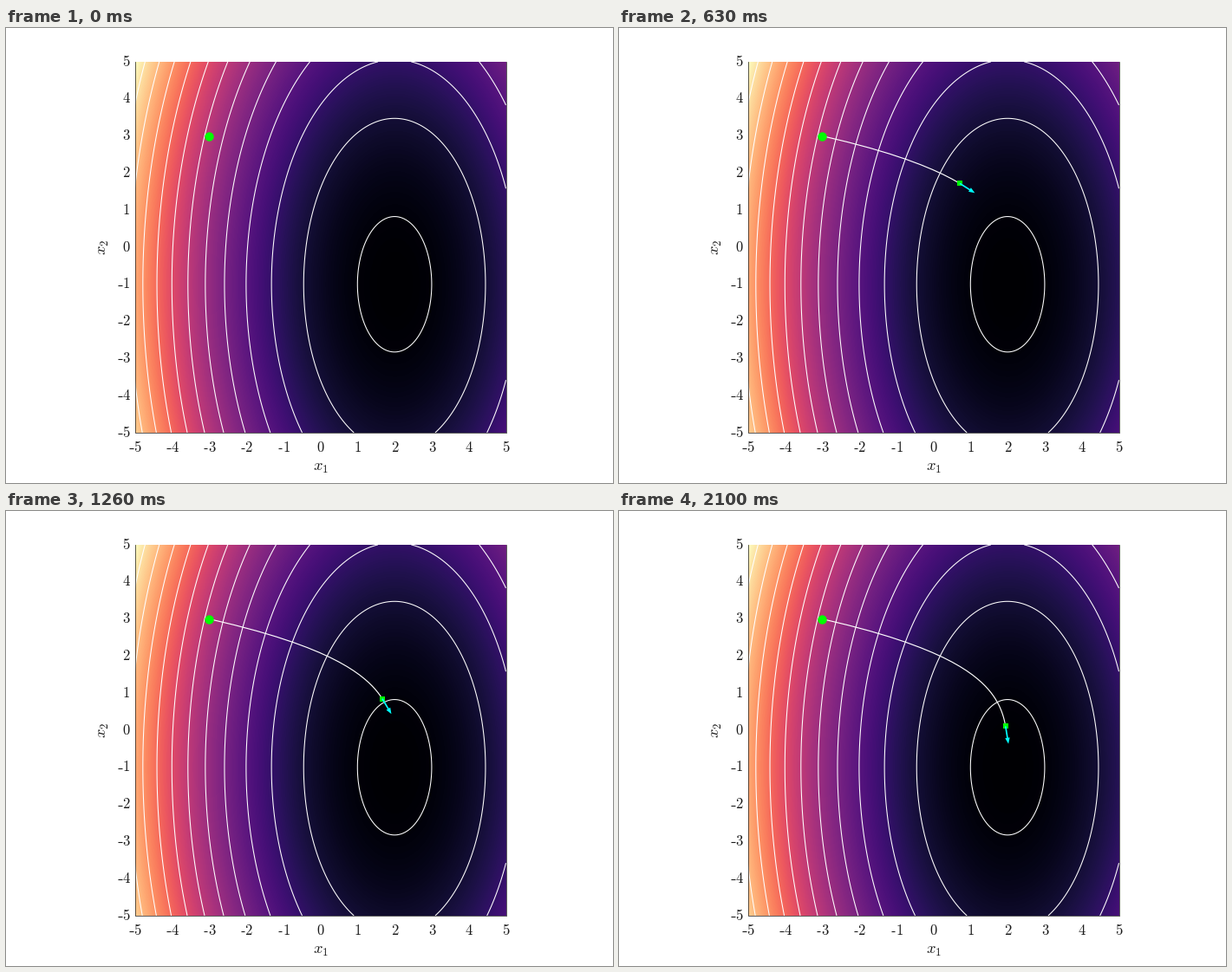
A matplotlib script that plays this animation: 700 px wide and 525 px high, repeating every 2.17 s.

```python
import numpy as np
import matplotlib.pyplot as plt
from matplotlib.animation import FuncAnimation

plt.rcParams["mathtext.fontset"] = "cm"

W, H, DPI = 700, 525, 100
FRAMES, INTERVAL = 31, 70
UNIT = 42.8                     # pixels per data unit
CX, CY = 362.5, 252.9           # pixel position of the data origin
LEFT, RIGHT = CX - 5 * UNIT, CX + 5 * UNIT
TOP, BOTTOM = CY - 5 * UNIT, CY + 5 * UNIT
PX = 72 / DPI                   # points per pixel
EM = 16.5                       # tick label size in pixels
GREEN, CYAN, INK = "#00ff00", "#00ffff", "#1a1a1a"

CENTER = np.array([2.0, -1.0])
CURVE = np.array([1.0, 0.3])
START = np.array([-3.0, 3.0])
RATE = 0.07
ARROW = 20.5


def cost(x, y):
    return CURVE[0] * (x - CENTER[0]) ** 2 + CURVE[1] * (y - CENTER[1]) ** 2


def gradient(p):
    return 2 * CURVE * (p - CENTER)


def to_px(p):
    return np.array([CX, CY]) + np.asarray(p) * [UNIT, -UNIT]


def descend(steps):
    points = [START]
    for _ in range(steps):
        points.append(points[-1] - RATE * gradient(points[-1]))
    return np.array(points)


def arrow_shape(tail, direction):
    u = direction / np.hypot(*direction)
    n = np.array([-u[1], u[0]])
    neck, half, head = ARROW - 7, 0.85, 2.7
    outline = [(0, half), (neck, half), (neck, head), (ARROW, 0),
               (neck, -head), (neck, -half), (0, -half)]
    return [tail + a * u + b * n for a, b in outline]


fig = plt.figure(figsize=(W / DPI, H / DPI), dpi=DPI, facecolor="white")
ax = fig.add_axes([0, 0, 1, 1])

# Cost surface and level curves
grid = np.linspace(-5, 5, 429)
mid = (grid[:-1] + grid[1:]) / 2
ax.imshow(cost(*np.meshgrid(mid, mid)), cmap="magma", origin="lower",
          extent=(LEFT, RIGHT, BOTTOM, TOP), aspect="auto",
          vmin=0, vmax=cost(-5, 5))
ax.contour(CX + grid * UNIT, CY - grid * UNIT, cost(*np.meshgrid(grid, grid)),
           levels=range(1, 60, 5), colors="white", linewidths=1.05 * PX)
ax.plot([LEFT, LEFT, RIGHT, RIGHT], [TOP, BOTTOM, BOTTOM, TOP],
        color=INK, lw=0.7 * PX)


def number(value, right, baseline):
    ax.text(right - EM / 4, baseline, f"${abs(value)}$", fontsize=EM * PX,
            ha="center", va="baseline", color=INK)
    if value < 0:
        x, y = right - 0.833 * EM, baseline - 0.216 * EM
        ax.plot([x + 0.01 * EM, x + 0.28 * EM], [y, y], color=INK,
                lw=1.1 * PX, solid_capstyle="butt")


for v in range(-5, 6):
    x, y = to_px((v, v))
    width = (0.833 if v < 0 else 0.5) * EM
    number(v, x + 0.6 + width / 2, 489)
    number(v, 143, y + 4.6)

label = dict(fontsize=18.5 * PX, ha="center", va="baseline", color=INK)
ax.text(363, 510.5, "$x_1$", **label)
ax.text(115.5, 253, "$x_2$", rotation=90, rotation_mode="anchor", **label)

ax.set_xlim(0, W)
ax.set_ylim(H, 0)
ax.axis("off")

# Moving parts
track = descend(FRAMES - 1)
track_px = to_px(track)
trail, = ax.plot([], [], color="white", lw=1.15 * PX, zorder=4)
marker, = ax.plot([], [], "s", color=GREEN, ms=6 * PX, mew=0, zorder=5)
arrow, = ax.fill([0, 0, 0], [0, 0, 0], color=CYAN, lw=0, zorder=6)
ax.plot(*track_px[0], "o", color=GREEN, ms=10.4 * PX, mew=0, zorder=7)


def update(i):
    moving = i > 0
    for part in (trail, marker, arrow):
        part.set_visible(moving)
    trail.set_data(*track_px[:i + 1].T)
    marker.set_data(*track_px[i:i + 1].T)
    arrow.set_xy(arrow_shape(track_px[i], gradient(track[i]) * [-1, 1]))
    return trail, marker, arrow


anim = FuncAnimation(fig, update, frames=FRAMES, interval=INTERVAL,
                     repeat=True, repeat_delay=0, blit=False)
plt.show()
```
